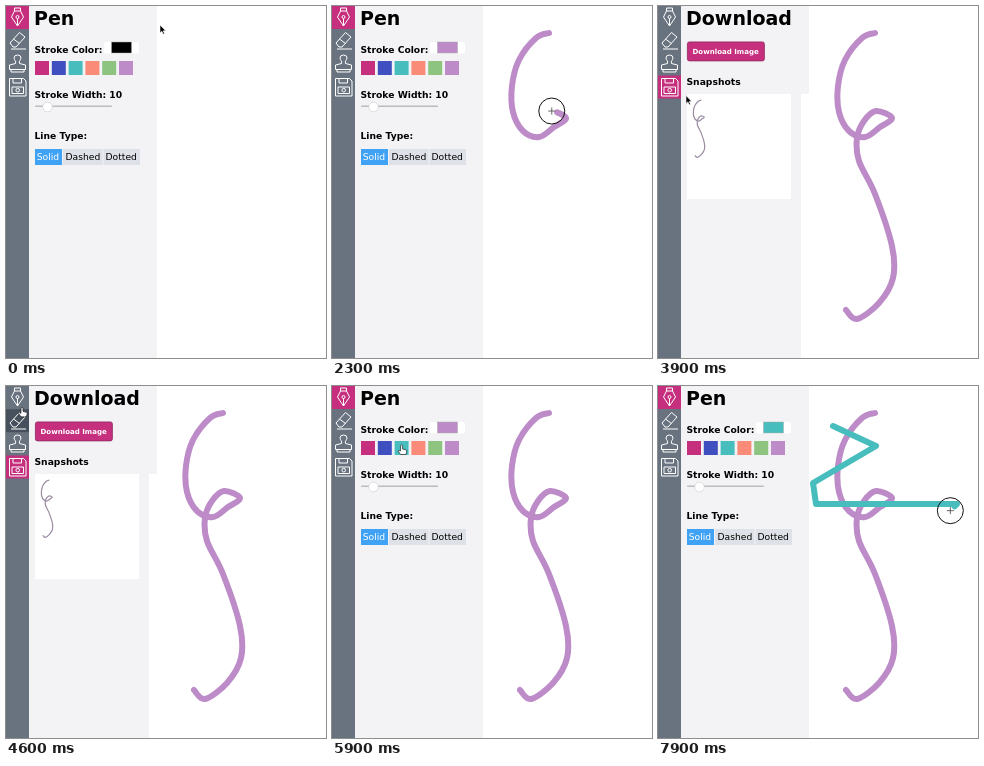
An HTML page that plays this animation: 320 px wide and 352 px high, repeating every 8000 ms.

```html
<!DOCTYPE html>
<html lang="en">
<head>
<meta charset="utf-8">
<title>Drawing tool</title>
<style>
  html, body { margin: 0; height: 100%; overflow: hidden; background: #fff; }
  svg { display: block; width: 320px; height: 352px; font: 9.2px "DejaVu Sans", Verdana, sans-serif; }
  .b { font-weight: bold; }
  .h { font-weight: bold; font-size: 19px; }
  .line { fill: none; stroke-width: 6; stroke-linecap: round; stroke-linejoin: round; }
  #icons { fill: none; stroke: #fff; stroke-width: 1; stroke-linejoin: round; }
</style>
</head>
<body>
<svg viewBox="0 0 320 352">
  <rect width="320" height="352" fill="#fff"/>
  <path id="purple" class="line" stroke="#bc8bc8"/>
  <path id="teal" class="line" stroke="#47bdbd" d="M175 40L218 60L155 97L158 118H299L285 132"/>

  <g id="pen">
    <rect x="23" width="128" height="352" fill="#f3f3f6"/>
    <text class="h" x="28" y="19">Pen</text>
    <text class="b" x="28.5" y="46.5">Stroke Color:</text>
    <rect x="98" y="36" width="35" height="11.5" rx="2" fill="#fff"/>
    <rect id="chosen" x="105.5" y="36" width="20" height="11" stroke="#aaa" stroke-width=".5"/>
    <g id="swatches"></g>
    <text class="b" x="28.5" y="92">Stroke Width: 10</text>
    <rect x="29" y="99.5" width="77" height="1.5" rx=".7" fill="#bcbcbf"/>
    <circle cx="41.5" cy="101" r="4.8" fill="#fff" stroke="#d2d2d6" stroke-width=".7"/>
    <text class="b" x="28.5" y="132.5">Line Type:</text>
    <rect x="29" y="143" width="27" height="16" fill="#40a2f4"/>
    <path d="M57 143H96.5V159H57zM97.5 143H134V159H97.5z" fill="#dfe1e8"/>
    <text x="30.7" y="154.3" fill="#fff">Solid</text>
    <text x="59.5" y="154.3">Dashed</text>
    <text x="99.5" y="154.3">Dotted</text>
  </g>

  <g id="download">
    <path d="M23 0H151V88H143V352H23z" fill="#f3f3f6"/>
    <text class="h" x="28" y="19">Download</text>
    <rect x="29.4" y="35.9" width="77" height="19" rx="2" fill="#c52f7d" stroke="#8f2a60" stroke-width=".8"/>
    <text class="b" x="34.5" y="48" font-size="7.05" fill="#fff">Download Image</text>
    <text class="b" x="28.5" y="79">Snapshots</text>
    <rect x="29" y="88" width="104" height="105" fill="#fff"/>
    <path id="thumb" class="line" stroke="#9b8ba3" transform="translate(-.5 88.8) scale(.2)"/>
  </g>

  <rect width="23" height="352" fill="#69737f"/>
  <rect id="hover" width="23" height="23" fill="#47515d"/>
  <rect id="active" width="23" height="23" fill="#c52f7d"/>
  <g id="icons">
    <path d="M8.5 2h6v3h-6zM8.5 5L5.5 11L11.5 20L17.5 11L14.5 5M11.5 20V12.5"/>
    <circle cx="11.5" cy="11" r="1.5"/>
    <path d="M4 37L13.5 26.5L19 31L10 41H7zM7.5 33L13.5 37.5M5 43H20"/>
    <path d="M9.5 57.5C10.5 55 8 54 8 52a3.5 3 0 0 1 7 0c0 2-2.5 3-1.5 5.500l6 1.5V63.5H3.500V59zM5 63.5V66H18V63.5"/>
    <path d="M3.5 72.5H17.500L20 75V90H3.500zM7 72.5V77H15.500V72.5M6 81H17.500V87.500H6z"/>
    <circle cx="11.7" cy="84.2" r="1.8"/>
  </g>

  <g id="cursor">
    <path id="arrow" d="M0 0V8l1.9-1.700 1.300 2.900 1.300-.6-1.300-2.800H5.700z" stroke="#fff" stroke-width=".6"/>
    <path id="hand" transform="translate(1 -3)" d="M-1 .5Q0-.7 1 .5V4l3.500 1Q5.500 5.300 5 7l-.7 2.500H-1L-3.500 6q.5-1.300 2.500 0z" fill="#fff" stroke="#222" stroke-width=".7"/>
    <path id="cross" d="M-3.5 0h7M0-3.500v7" stroke="#555" stroke-width=".9"/>
    <circle id="ring" r="13" fill="none" stroke="#111"/>
  </g>
</svg>
<script>
const LOOP = 8000, STEP = 100, TAB = 23.2, TRAIL = 6;
const $ = id => document.getElementById(id);
const show = (id, on) => $(id).style.display = on ? '' : 'none';
const ease = k => (k = Math.min(1, Math.max(0, k)), k * k * (3 - 2 * k));

const colors = ['#c52f7d', '#3f4fbf', '#47bdbd', '#f98b78', '#8cc480', '#bc8bc8'];
const swatchX = i => 29 + i * 16.8;
$('swatches').innerHTML = colors.map((c, i) =>
  `<rect x="${swatchX(i)}" y="55" width="14" height="14" fill="${c}"/>`).join('');

// Smooth curve through points (Catmull-Rom)
function curve(pts) {
  const at = i => pts[Math.min(pts.length - 1, Math.max(0, i))];
  const handle = (i, s) => at(i).map((v, k) => v + s * (at(i + 1)[k] - at(i - 1)[k]) / 6);
  return 'M' + pts[0] + pts.slice(1).map((p, i) => `C${handle(i, 1)} ${handle(i + 1, -1)} ${p}`).join('');
}

const squiggle = curve([
  [217, 27], [204, 32], [187, 54], [180, 80], [181, 106], [191, 125], [207, 131], [222, 121], [234, 112],
  [218, 105], [206, 115], [199, 132], [201, 155], [217, 188], [234, 240], [235, 272], [221, 297],
  [199, 313], [188, 304]
]);
$('purple').setAttribute('d', squiggle);
$('thumb').setAttribute('d', squiggle);

const strokes = [
  { path: $('purple'), start: 1800, end: 2920 },
  { path: $('teal'), start: 7100, end: 8000 }
];

// Pointer glides between strokes: each leaves where the last one ended
const glides = [
  { start: 0, end: 0, to: [154, 19] },
  { start: 0, end: 900, to: [swatchX(5) + 6, 62] },
  { start: 1000, end: 1800, to: [217, 27] },
  { start: 2920, end: 2920, to: [187, 302] },
  { start: 3100, end: 3600, to: [11, 3.5 * TAB] },
  { start: 3700, end: 4100, to: [45, 98] },
  { start: 4200, end: 4600, to: [15, 1.05 * TAB] },
  { start: 4700, end: 5100, to: [14, 0.7 * TAB] },
  { start: 5200, end: 5900, to: [swatchX(2) + 6, 62] },
  { start: 6200, end: 6700, to: [209, 52] },
  { start: 6700, end: 7100, to: [175, 40] }
];

function pointer(t) {
  const n = glides.findLastIndex(g => t >= g.start);
  const { start, end, to } = glides[n], from = glides[n - 1].to;
  const k = end > start ? ease((t - start) / (end - start)) : 1;
  return from.map((v, i) => v + (to[i] - v) * k);
}

function draw(t) {
  let [x, y] = pointer(t), pressed = false;
  for (const { path, start, end } of strokes) {
    const total = path.getTotalLength();
    const done = total * ease((t - start) / (end - start));
    const busy = t > start && t < end;
    const ink = busy ? Math.max(0, done - TRAIL) : done;
    path.style.display = t > start ? '' : 'none';
    path.style.strokeDasharray = `${ink} ${total + 1}`;
    if (busy) {
      pressed = true;
      ({ x, y } = path.getPointAtLength(done));
    }
  }

  const saving = t >= 3700 && t < 5200;
  show('pen', !saving);
  show('download', saving);
  $('active').setAttribute('y', saving ? 69.5 : 0);
  $('chosen').setAttribute('fill', t < 1000 ? '#000' : t < 6200 ? colors[5] : colors[2]);

  const within = (l, top, r, b) => x >= l && x < r && y >= top && y < b;
  const onBar = within(0, 0, 23, 4 * TAB);
  const onControl = saving ? within(29, 35, 107, 56) : within(29, 55, 127, 69);
  const onCanvas = x > 151 && t > 0;
  show('hover', onBar);
  $('hover').setAttribute('y', Math.floor(y / TAB) * TAB);
  show('cross', onCanvas);
  show('hand', onBar || onControl);
  show('arrow', !onCanvas && !onBar && !onControl);
  show('ring', pressed);
  $('cursor').setAttribute('transform', `translate(${x} ${y})`);
}

function tick() {
  const t = performance.now() % LOOP;
  draw(Math.floor(t / STEP) * STEP);
  requestAnimationFrame(tick);
}
tick();
</script>
</body>
</html>
```
